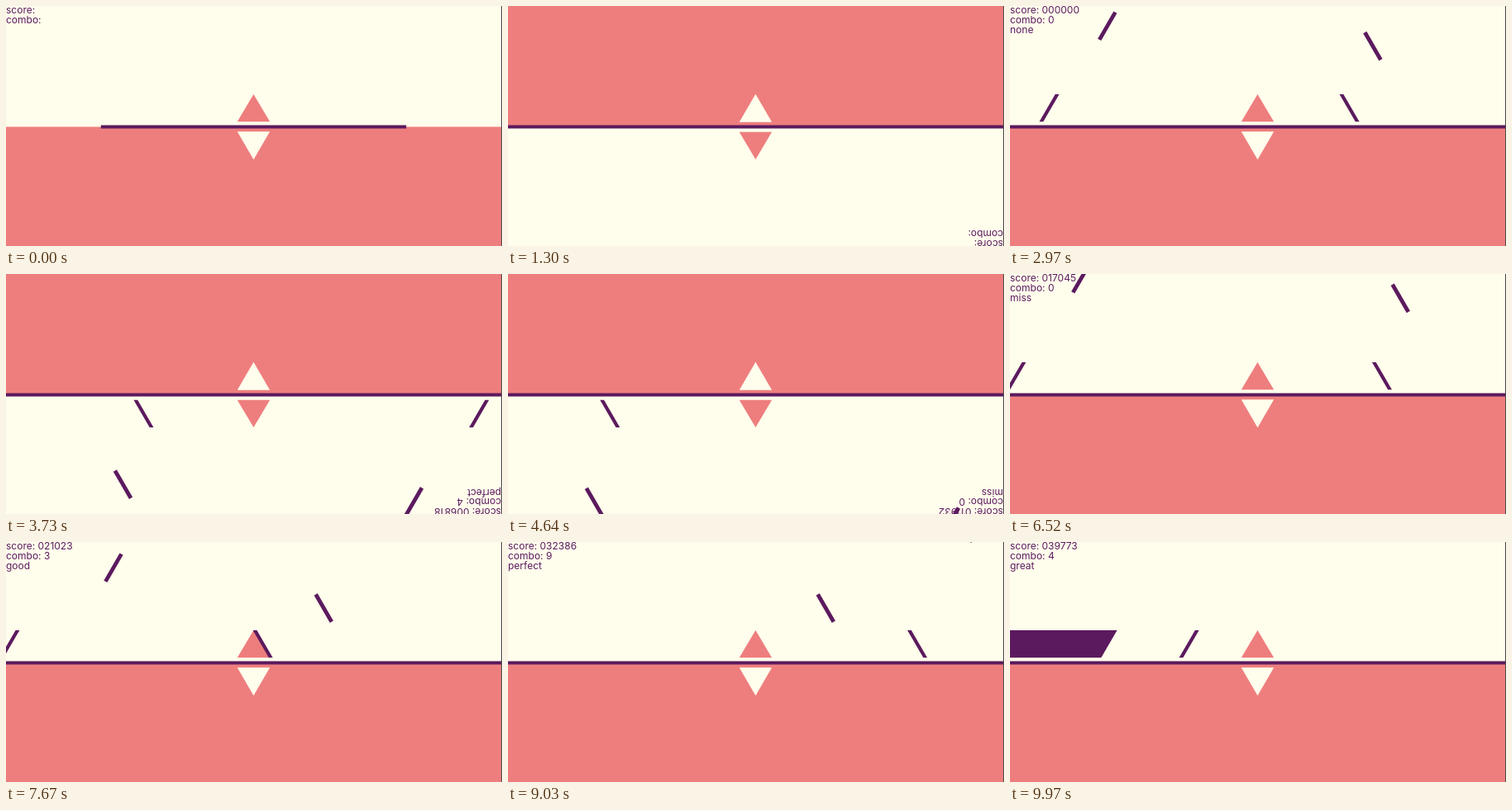
An HTML page for the animation above (10 s loop, 600x291 px).

```html
<!DOCTYPE html>
<html lang="en">
<head>
<meta charset="utf-8">
<title>Rhythm game</title>
<style>
  html, body { margin: 0; width: 100%; height: 100%; overflow: hidden; background: #fffdec; }
  svg { display: block; width: 100vw; height: 100vh; }
  text { font: 12px Montserrat, Inter, sans-serif; fill: #5b1a5e; white-space: pre; }
  .cream { fill: #fffdec; }
  .coral { fill: #ee7e7e; }
  .ink { fill: #5b1a5e; }
</style>
</head>
<body>
<svg viewBox="0 0 600 291" preserveAspectRatio="none">
  <defs>
    <clipPath id="sky"><rect x="-200" y="-400" width="1000" height="540.5"/></clipPath>
  </defs>
  <g id="world">
    <rect class="cream" x="-200" y="-400" width="1000" height="548"/>
    <rect class="coral" x="-200" y="146.5" width="1000" height="500"/>
    <path class="coral" d="M299.5 107L319.2 140.3H279.8Z"/>
    <path class="cream" d="M299.5 186.3L319.2 152.3H279.8Z"/>
    <g id="notes" class="ink" clip-path="url(#sky)"></g>
    <rect id="bar" class="ink" y="144.5" height="4"/>
    <text id="score" x="0" y="9"></text>
    <text id="combo" x="0" y="21"></text>
    <text id="grade" x="0" y="32.5"></text>
  </g>
  <rect x="599" width="1" height="291" fill="#4a4648"/>
</svg>
<script>
const LOOP = 10000;
const SPEED = 0.4145;   // px per ms
const LATE = 70;        // how long a missed note stays
const POINT = 568.182;
const START = 2520;
const FLIP_MS = 180;
const flips = [1120, 1968, 3346, 6280];
const words = ['miss', 'good', 'great', 'perfect', 'perfect'];

// Each run: lanes (L/R side, G ground or A air), then time and points per note
const runs = [
  ['RG RA LA LG', 3216, 3, 3332, 3, 3450, 3, 3556, 3],
  ['RG RA LA LG', 4029, 3, 4144, 3, 4244, 3, 4366, 0],
  ['RA LG', 4480, 0, 4480, 0],
  ['RG RA LA LG', 5043, 0, 5157, 0, 5271, 0, 5384, 0],
  ['RG RA LA LG', 5837, 3, 5952, 3, 6052, 3, 6191, 0],
  ['RA LG', 6290, 0, 6293, 0],
  ['RG RA LA LG', 6861, 0, 6975, 3, 7089, 3, 7203, 1],
  ['RG RA LA LG', 7675, 3, 7880, 3, 8116, 3, 8360, 3],
  ['LG LA -- RA RG', 8793, 4, 9020, 4, 9030, 0, 9240, 3, 9480, 4],
  ['RA LA LG LH', 9708, 4, 9927, 2, 10148, 3, 10387, 3]
];

const shapes = {
  G: 'M297.2 107h4.8l-19.4 33.4h-4.8Z',
  H: 'M-103 107H302l-19.4 33.4H-103Z',
  A: 'M-2.4 -19.2h4.8v38.4h-4.8Z'
};

const $ = id => document.getElementById(id);
const NS = 'http://www.w3.org/2000/svg';

const notes = runs.flatMap(([lanes, ...v]) => lanes.split(' ').map((lane, i) => {
  const t = v[2 * i], pts = v[2 * i + 1];
  const note = { side: lane[0], kind: lane[1], t, pts, end: pts ? t : t + LATE };
  if (shapes[note.kind]) {
    note.el = document.createElementNS(NS, 'path');
    note.el.setAttribute('d', shapes[note.kind]);
    $('notes').append(note.el);
  }
  return note;
}));
const results = [...notes].sort((a, b) => a.end - b.end);

function placeNote(n, t) {
  if (!n.el) return;
  const d = (n.t - t) * SPEED;
  const shown = d < 310 && t < n.end;
  n.el.style.display = shown ? '' : 'none';
  if (!shown) return;
  const mirror = n.side === 'R' ? 'translate(599 0) scale(-1 1) ' : '';
  const move = n.kind === 'A'
    ? `translate(${289.7 - d * 0.866} ${123.5 - d * 0.5}) rotate(30)`
    : `translate(${-d} 0)`;
  n.el.setAttribute('transform', mirror + move);
}

function showScore(t) {
  let sum = 0, combo = 0, grade = 'none';
  for (const n of results) {
    if (n.end > t) break;
    sum += n.pts;
    combo = n.pts ? combo + 1 : 0;
    grade = words[n.pts];
  }
  const on = t >= START;
  const digits = String(Math.round(sum * POINT)).padStart(6, '0');
  $('score').textContent = 'score:' + (on ? ' ' + digits : '');
  $('combo').textContent = 'combo:' + (on ? ' ' + combo : '');
  $('grade').textContent = on ? grade : '';
}

function draw(t) {
  const turns = flips.reduce((s, f) => s + Math.min(1, Math.max(0, (t - f) / FLIP_MS)), 0);
  $('world').setAttribute('transform', `rotate(${turns * 180} 299.5 146.5)`);

  const half = t < 600 ? 184.5 + 116 * t / 600 : 420;
  $('bar').setAttribute('x', 299.5 - half);
  $('bar').setAttribute('width', half * 2);

  notes.forEach(n => placeNote(n, t));
  showScore(t);
}

const began = performance.now();
function tick() {
  draw((performance.now() - began) % LOOP);
  requestAnimationFrame(tick);
}
tick();
</script>
</body>
</html>
```
